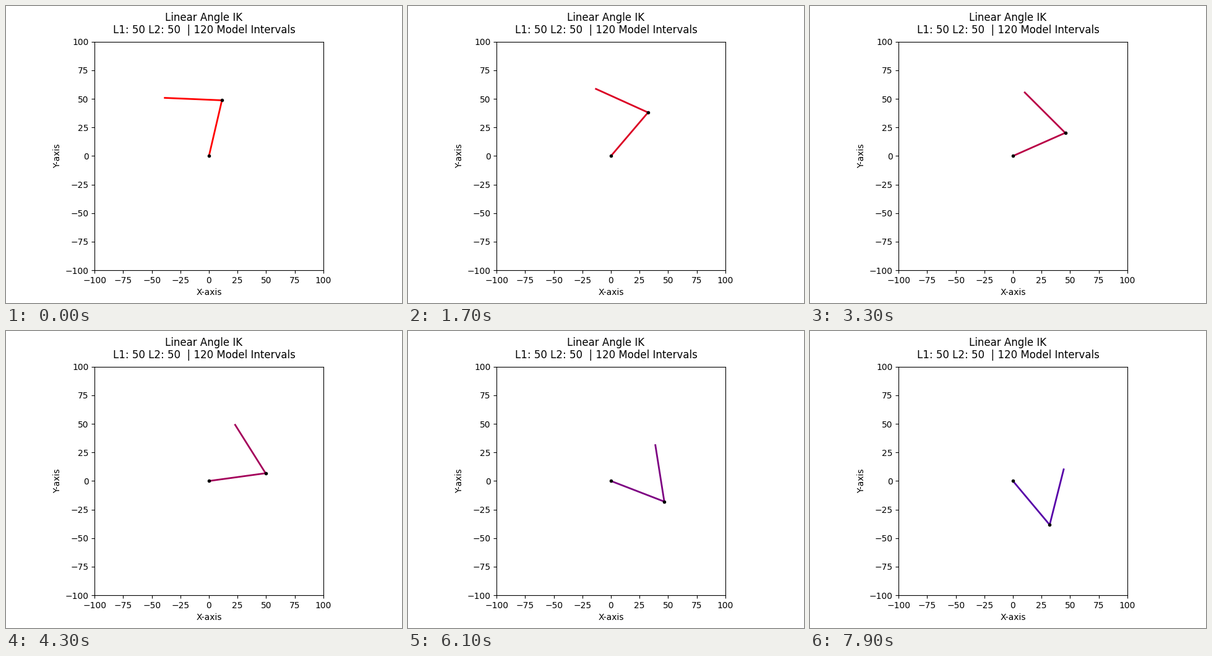
Animation of 640x480 px, one loop 8 s. Source, as a matplotlib script:

```python
import numpy as np
import matplotlib.pyplot as plt
from matplotlib.animation import FuncAnimation

L1 = L2 = 50
STEPS = 120
FRAMES = 80
START, END = (-40, 50), (25, -25)


def solve_ik(x, y):
    """Absolute angles of both links for an elbow-right two-link arm."""
    r2 = x * x + y * y
    bend = np.arccos((r2 - L1**2 - L2**2) / (2 * L1 * L2))
    shoulder = np.arctan2(y, x) - np.arctan2(L2 * np.sin(bend), L1 + L2 * np.cos(bend))
    return np.array([shoulder, shoulder + bend])


def pose(step):
    """Base, elbow and tip with the angles interpolated linearly."""
    a, b = A0 + (A1 - A0) * step / STEPS
    elbow = L1 * np.array([np.cos(a), np.sin(a)])
    tip = elbow + L2 * np.array([np.cos(b), np.sin(b)])
    return np.array([(0, 0), elbow, tip])


A0, A1 = solve_ik(*START), solve_ik(*END)

fig, ax = plt.subplots(figsize=(6.4, 4.8), dpi=100)
fig.suptitle(f"Linear Angle IK\nL1: {L1} L2: {L2}  | {STEPS} Model Intervals")
ax.set(xlim=(-100, 100), ylim=(-100, 100), xlabel="X-axis", ylabel="Y-axis")
ax.set_aspect("equal")

arm, = ax.plot([], [], lw=2)
joints, = ax.plot([], [], "k.")


def update(i):
    pts = pose(i + 1)
    t = i / STEPS
    arm.set_data(pts[:, 0], pts[:, 1])
    arm.set_color((1 - t, 0, t))
    joints.set_data(pts[:2, 0], pts[:2, 1])
    return arm, joints


anim = FuncAnimation(fig, update, frames=FRAMES, interval=100, repeat=True, repeat_delay=0)
plt.show()
```
